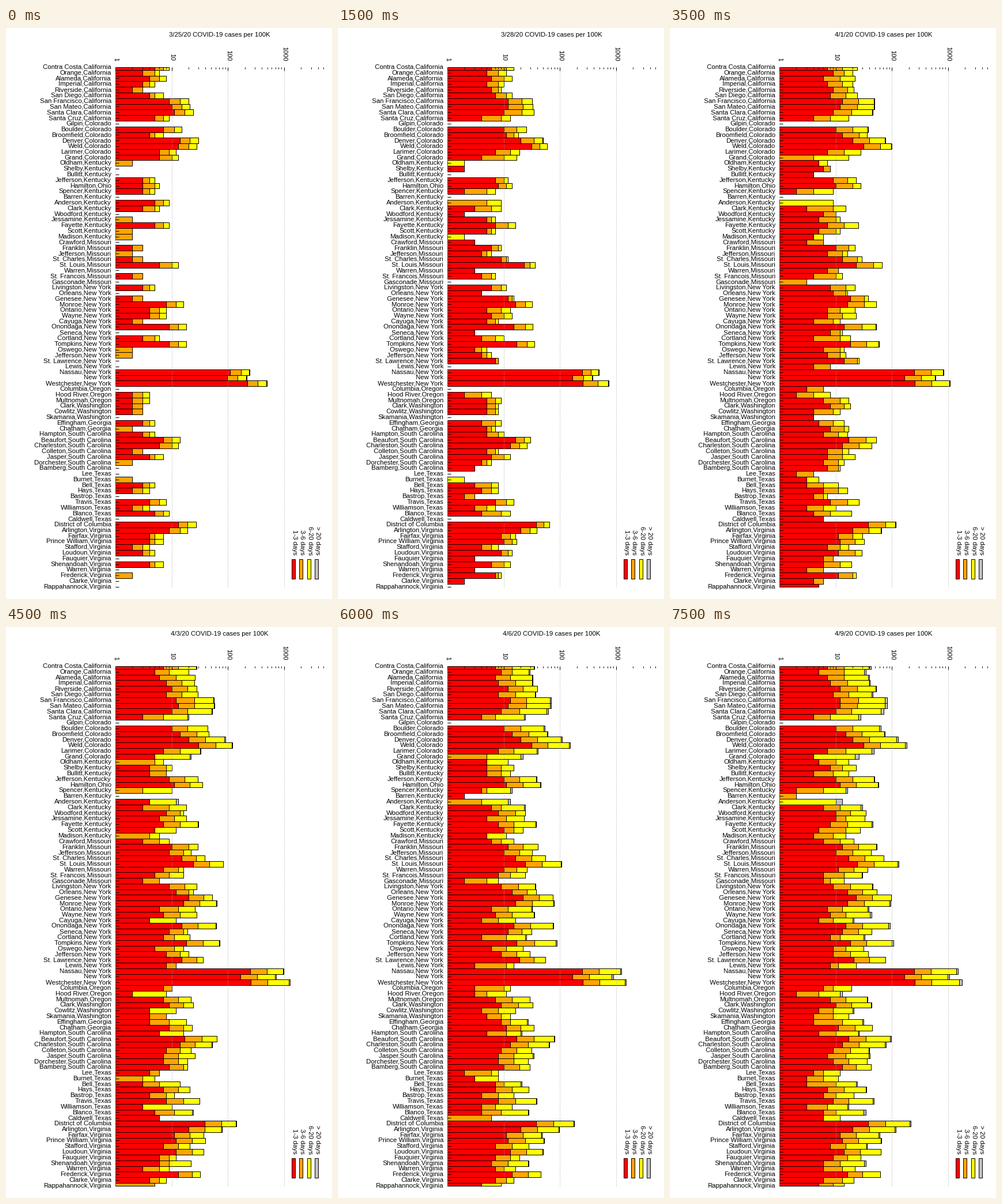
A matplotlib script that plays this animation: 566x990 px, repeating every 8 s.

```python
import numpy as np
import matplotlib.pyplot as plt
from matplotlib.animation import FuncAnimation
from matplotlib.patches import Rectangle

W, H, DPI = 566, 990, 100
PX = 72 / DPI       # one pixel in points
HAIR = 0.98 * PX    # stays one pixel wide after snapping
LEFT, DECADE = 190, 97.65
TOP, BOTTOM = 67.9, 968.8
FRAMES = 16
EARLY_DECAY = 0.82  # per day, before the first date shown

plt.rcParams["lines.scale_dashes"] = False
FONT = dict(family="Liberation Sans", size=11.4 * PX, color="black")

labels, ends = [], []


def add(state, **counties):
    """Append counties with their first and last cases per 100K."""
    for name, pair in counties.items():
        name = name.replace("_", " ").replace("St ", "St. ")
        labels.append(name if name == state else f"{name},{state}")
        ends.append(pair)


add("California", Contra_Costa=(9, 42), Orange=(6, 34), Alameda=(8, 40),
    Imperial=(5, 41), Riverside=(3, 52), San_Diego=(7, 46),
    San_Francisco=(20, 82), San_Mateo=(21, 82), Santa_Clara=(24, 72),
    Santa_Cruz=(9, 28))
add("Colorado", Gilpin=(0, 0), Boulder=(15, 64), Broomfield=(7, 75),
    Denver=(30, 130), Weld=(28, 182), Larimer=(12, 48), Grand=(13, 26))
add("Kentucky", Oldham=(2, 17), Shelby=(0, 23), Bullitt=(0, 17),
    Jefferson=(5, 49))
add("Ohio", Hamilton=(6, 58))
add("Kentucky", Spencer=(5, 16), Barren=(0, 2), Anderson=(9, 13),
    Clark=(6, 30), Woodford=(0, 34), Jessamine=(2, 33), Fayette=(9, 46),
    Scott=(2, 27), Madison=(2, 15))
add("Missouri", Crawford=(0, 21), Franklin=(3, 54), Jefferson=(2, 42),
    St_Charles=(3, 72), St_Louis=(13, 131), Warren=(0, 37),
    St_Francois=(3, 30), Gasconade=(0, 14))
add("New York", Livingston=(5, 46), Orleans=(0, 54), Genesee=(3, 97),
    Monroe=(16, 95), Ontario=(8, 39), Wayne=(8, 43), Cayuga=(3, 21),
    Onondaga=(18, 92), Seneca=(0, 44), Cortland=(6, 33), Tompkins=(18, 106),
    Oswego=(2, 31), Jefferson=(2, 38), St_Lawrence=(1, 76), Lewis=(0, 23),
    Nassau=(242, 1480), New_York=(214, 1048), Westchester=(488, 1765))
add("Oregon", Columbia=(0, 19), Hood_River=(4, 13), Multnomah=(4, 37))
add("Washington", Clark=(3, 43), Cowlitz=(3, 21), Skamania=(0, 17))
add("Georgia", Effingham=(5, 31), Chatham=(2, 45))
add("South Carolina", Hampton=(5, 26), Beaufort=(14, 98),
    Charleston=(13, 78), Colleton=(3, 40), Jasper=(7, 41),
    Dorchester=(2, 36), Bamberg=(0, 42))
add("Texas", Lee=(0, 12), Burnet=(2, 11), Bell=(5, 24), Hays=(4, 35),
    Bastrop=(1, 21), Travis=(8, 48), Williamson=(4, 17), Blanco=(9, 34),
    Caldwell=(0, 12))
add("District of Columbia", District_of_Columbia=(27, 218))
add("Virginia", Arlington=(19, 118), Fairfax=(7, 60),
    Prince_William=(7, 65), Stafford=(4, 36), Loudoun=(5, 64),
    Fauquier=(0, 28), Shenandoah=(7, 34), Warren=(0, 22),
    Frederick=(2, 62), Clarke=(0, 21), Rappahannock=(0, 14))

first, last = np.array(ends, float).T
gain = last - first

# Late starters speed up; in small counties one new case is a visible jump
power = 1 + 0.6 * np.exp(-first / 4)
rng = np.random.default_rng(4)
jump = np.where(last < 35, rng.integers(2, 6, len(last)), 1)
steps = np.maximum(1, np.rint(gain / jump))


def total(day):
    """Cumulative cases of every county, days counted from 3/25."""
    if day <= 0:
        return np.floor(first * EARLY_DECAY ** -day)
    t = (day / (FRAMES - 1)) ** power
    return np.rint(first + gain * np.rint(t * steps) / steps)


def x_of(value):
    return LEFT + DECADE * np.log10(np.maximum(value, 1))


fig = plt.figure(figsize=(W / DPI, H / DPI), dpi=DPI, facecolor="white")
ax = fig.add_axes([0, 0, 1, 1])
ax.axis("off")


def line(x0, y0, x1, y1, **style):
    style = {"color": "black", "zorder": 4, **style}
    ax.plot([x0, x1], [y0, y1], lw=HAIR, solid_capstyle="butt",
            dash_capstyle="butt", **style)


def down_text(x, y, text):
    ax.text(x, y, text, rotation=-90, rotation_mode="anchor",
            ha="right", va="baseline", **FONT)


# Value axis: ticks, dotted grid and labels
for decade in range(4):
    for digit in range(1, 10):
        value = digit * 10 ** decade
        if value <= 5000:
            x = x_of(value)
            line(x, TOP, x, TOP + (6 if digit == 1 else 3))
    x = x_of(10 ** decade)
    line(x, TOP, x, BOTTOM, color="#a0a0a0", ls=(0, (PX, 2 * PX)), zorder=3)
    down_text(x - 2.5, 57, str(10 ** decade))

# County axis
rows = np.linspace(TOP, BOTTOM, len(labels))
for y, label in zip(rows, labels):
    line(LEFT, y, LEFT + 6, y)
    ax.text(183, y + 3, label, ha="right", va="baseline", **FONT)

title = ax.text(371, 15, "", ha="center", va="baseline", **FONT)

# Stacked bars, widest series first: colour, age limit in days, legend text
SERIES = [("#c0c0c0", np.inf, "> 20 days"), ("#ffff00", 20, "6-20 days"),
          ("#ffa500", 6, "3-6 days"), ("#ff0000", 3, "1-3 days")]
OUTLINE = dict(edgecolor="black", linewidth=HAIR)

half = (rows[1] - rows[0]) / 2
tops = np.maximum(rows - half, TOP)
heights = np.minimum(rows + half, BOTTOM) - tops
bars = []
for k, (color, age, text) in enumerate(SERIES):
    group = ax.barh(tops, 0, height=heights, left=LEFT, align="edge",
                    color=color, zorder=2, **OUTLINE)
    bars.append((group, age))
    x = 536.2 - 13.4 * k
    ax.add_patch(Rectangle((x, 921), 6, 34, facecolor=color, **OUTLINE))
    down_text(x + 2, 914, text)
ax.set(xlim=(0, W), ylim=(H, 0))


def update(day):
    date = 25 + day
    month, date = (3, date) if date <= 31 else (4, date - 31)
    title.set_text(f"{month}/{date}/20 COVID-19 cases per 100K")
    now = total(day)
    for group, age in bars:
        widths = x_of(now - total(day - age)) - LEFT
        for bar, width in zip(group, widths):
            bar.set_width(width)
            bar.set_visible(width > 0)
    return []


anim = FuncAnimation(fig, update, frames=FRAMES, interval=500, repeat=True,
                     blit=False)
plt.show()
```
